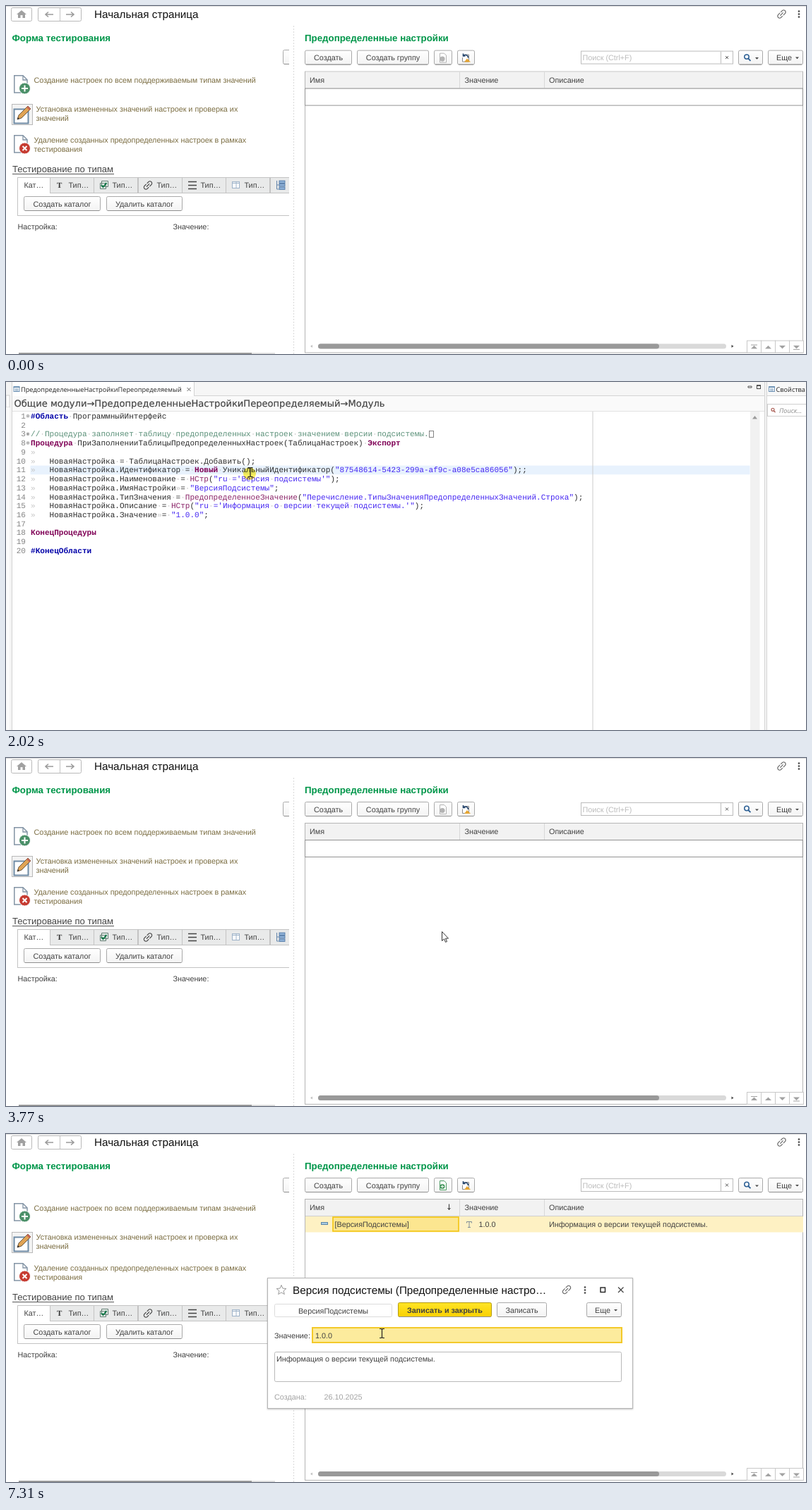
An HTML page that plays this animation: 1133x494 px, repeating every 8 s.

```html
<!DOCTYPE html>
<html lang="ru">
<head>
<meta charset="utf-8">
<title>Предопределенные настройки</title>
<style>
html, body { margin: 0; height: 100%; overflow: hidden; background: #fff; }
svg { display: block; width: 100vw; height: 100vh; }
text { font-family: "Liberation Sans", Arial, sans-serif; white-space: pre; text-rendering: geometricPrecision; }
.code { font-family: "Liberation Mono", "Courier New", monospace; }
.ide { font-family: "Open Sans", "Noto Sans", sans-serif; }
.crumb { font-family: "DejaVu Sans", sans-serif; stroke: #444; stroke-width: .2; }
.ws { fill: #c6c6c6; font-weight: normal; }
.com { fill: #5a9078; }
.str { fill: #4526f2; }
.key { fill: #7f0055; font-weight: bold; }
.fn { fill: #8a2468; }
.dir { fill: #0000a8; font-weight: bold; }
#halo { mix-blend-mode: multiply; }
</style>
</head>
<body>
<svg id="stage" viewBox="0 0 1133 494" preserveAspectRatio="none"></svg>
<script>
const INK = '#404040', UI = 10.8, GREEN = '#00964a', GRAY = '#9b9b9b';
const LOOP = 8000, CODE_IN = 510, CODE_OUT = 2520, CLIP = 2770,
      ROW = 4540, SORT = 5040, DIALOG = 5550, UNSELECT = 7060;

const text = (x, y, s, size = UI, fill = INK, attr = '') =>
  `<text x="${x}" y="${y}" font-size="${size}" fill="${fill}" ${attr}>${s}</text>`;
const rect = (x, y, w, h, fill = 'none', stroke = 'none', attr = '') =>
  `<rect x="${x}" y="${y}" width="${w}" height="${h}" fill="${fill}" stroke="${stroke}" ${attr}/>`;
const path = (d, stroke, fill = 'none', w = 1) =>
  `<path d="${d}" stroke="${stroke}" fill="${fill}" stroke-width="${w}"/>`;
const circle = (x, y, r, fill, attr = '') => `<circle cx="${x}" cy="${y}" r="${r}" fill="${fill}" ${attr}/>`;
const at = (x, y, s, more = '') => `<g transform="translate(${x} ${y}) ${more}">${s}</g>`;
const group = (id, s) => `<g id="${id}">${s}</g>`;
const BOLD = 'font-weight="bold"', MID = 'text-anchor="middle"';

const button = (x, y, w, label = '', fill = 'url(#btn)', stroke = '#a9a9a9', attr = '') =>
  rect(x + .5, y + .5, w - 1, 20, fill, stroke, 'rx="2"') +
  path(`M${x + 2} ${y + 20.5}h${w - 4}`, '#8f8f8f') +
  text(x + w / 2, y + 14.5, label, UI, INK, MID + ' ' + attr);
const more = (x, y) =>
  button(x, y, 50) + text(x + 12, y + 14.5, 'Еще') + path(`M${x + 39} ${y + 10}h5l-2.5 2.6z`, 'none', '#444');
const link = (x, y, c) => at(x, y,
  path('M-1 2.8h-3a2.8 2.8 0 0 1 0-5.6h3.4M1-2.8h3a2.8 2.8 0 0 1 0 5.6H.6M-3 0h6', c, 'none', 1.2), 'rotate(-45)');
const dots = (x, y) => [-4, 0, 4].map(d => circle(x, y + d, 1.3, '#444')).join('');
const page = (x, y, color, sign) => at(x, y,
  path('M.8.8H13l6 6V25H.8z', '#8394a5', '#fff', 1.5) + path('M13 1v6h6', '#8394a5', 'none', 1.3) +
  circle(15.5, 19, 8, color, 'stroke="#fff"') + path(sign, '#fff', 'none', 2));

function header() {
  return rect(0, 0, 1133, 494, '#fff') + path('M0 .5H1133', '#dedede') +
    rect(7.5, 2.5, 29, 19, '#fff', '#b9b9b9', 'rx="2"') +
    path('M15 12l7-6 7 6h-2v5h-3.5v-4h-3v4H17v-5z', 'none', '#a0a0a0') +
    rect(45.5, 2.5, 61, 19, '#fff', '#b9b9b9', 'rx="2"') + path('M76.5 3v18', '#c4c4c4') +
    path('M67 12H56m4-3.5L56 12l4 3.5M85 12h11m-4-3.5l4 3.5-4 3.5', GRAY, 'none', 1.6) +
    text(125, 17.3, 'Начальная страница', 15.26, '#111') +
    link(1098.5, 11.5, '#666') + dots(1123, 11.5) +
    `<path d="M407.5 28V494" stroke="#d9d9d9" stroke-dasharray="2 2"/>`;
}

function leftPane() {
  const olive = '#7a6c40';
  const tabs = [63, 125, 188, 250, 312, 375].map((x, i) =>
    rect(x - .5, 243.5, 62, 22, '#e9eaea', '#c3c3c3') + (i < 5 ? text(x + 25.5, 258, 'Тип…') : '')).join('');
  const icons =
    text(72, 258, 'T', 11, '#333', BOLD + ' style="font-family:Liberation Serif,serif"') +
    path('M135.5 248.5h9v8h-9zM133.5 251.5h8v8h-8z', '#5f7a70', '#eef4f0') + path('M135 254l2.5 3 5-6', '#15784a', 'none', 2) +
    link(201, 254.5, '#444') + path('M258 249.5h12m-12 5h12m-12 5h12', '#444', 'none', 1.4) +
    rect(320.5, 249.5, 10, 9, '#fff', '#9db2c8') + path('M321 251.5h10m-5-2v9', '#9db2c8') +
    path('M383.5 248v12h3m-3-6h3', '#6486ab') +
    [248, 252.5, 257].map(y => rect(387, y, 8, 3.4, '#8eb0d6', '#4973a3', 'stroke-width=".8"')).join('');
  return text(8.5, 50.3, 'Форма тестирования', 13.3, GREEN, BOLD) +
    page(11, 98, '#4b9069', 'M11 19h9m-4.5-4.5v9') +
    text(39.5, 109, 'Создание настроек по всем поддерживаемым типам значений', UI, olive) +
    rect(8.5, 139.5, 29, 29, '#f3f3f3', '#b9b9b9') + rect(11.5, 146.5, 20, 20, '#fff', '#6f8ba5', 'stroke-width="2"') +
    path('M16 161l2-6 13-13 4 4-13 13z', '#6a5741', '#e0a354') + path('M29 144l2-2 4 4-2 2z', 'none', '#c96a55') +
    path('M16 161l1-3 2 2z', 'none', '#333') +
    text(42.5, 150, 'Установка измененных значений настроек и проверка их', UI, olive) + text(42.5, 163, 'значений', UI, olive) +
    page(11, 183, '#c63c32', 'M12.5 16l6 6m0-6l-6 6') +
    text(39.5, 194, 'Удаление созданных предопределенных настроек в рамках', UI, olive) + text(39.5, 207, 'тестирования', UI, olive) +
    text(9, 236.3, 'Тестирование по типам', 13.08, '#444') + path('M9 238.5h144', '#555') +
    `<g clip-path="url(#left)">` + button(392, 62, 40) + rect(16.5, 243.5, 400, 54, '#fff', '#c3c3c3') + tabs +
    path('M62 265.5h340', '#c3c3c3') + text(25.5, 258, 'Кат…') + icons + '</g>' +
    button(25, 270, 109, 'Создать каталог') + button(142, 270, 108, 'Удалить каталог') +
    text(16.5, 317, 'Настройка:') + text(236.5, 317, 'Значение:') +
    rect(18, 492.4, 363, 2, '#d9d9d9') + rect(18, 492.4, 330, 2, '#8c8c8c');
}

function rightPane() {
  const doc = (c, sign) => path('M614.5 66.5h6l3 3v10h-9z', c, '#fff') + circle(618, 74.5, 3.6, c) + sign;
  const nav = [0, 1, 2, 3].map(i => at(1049.5 + 20 * i, 474.5, rect(0, 0, 20, 17, '#fff', '#c8c8c8') +
    path(i < 2 ? 'M5.5 11.5h9L10 7z' : 'M5.5 7h9L10 11.5z', 'none', '#a2a2a2') +
    (i % 3 ? '' : path(i ? 'M5.5 12.5h9' : 'M5.5 6h9', '#a2a2a2')))).join('');
  const empty = rect(423.5, 116.5, 705, 24, '#fff', '#939393');
  const row = rect(424, 117, 705, 22.5, '#fef1c3') + rect(463, 118, 178, 20, '#fce690', '#f3c50f', 'stroke-width="1.6"') +
    rect(446.5, 125.5, 9, 3, '#a9cbe3', '#5c86a6') + text(465.5, 132, '[ВерсияПодсистемы]') +
    path('M652.5 126.5v-2h7v2m-3.5-2v8m-2 0h4', '#7f8c99') + text(669.5, 132, '1.0.0') +
    text(769, 132, 'Информация о версии текущей подсистемы.');
  return button(423, 62, 67, 'Создать') + button(497, 62, 102, 'Создать группу') +
    button(606, 62, 26) + group('docOff', doc('#b3b3b3', '')) +
    group('docOn', doc('#4b9a62', path('M615.8 74.5h4.4m-2.2-2.2v4.4', '#fff'))) +
    button(639, 62, 25) + path('M649.5 68.5h6v10h-9v-6', '#8b8b8b', '#fff') + path('M654.5 73c0-4-4-5-7-3m0-3v3.4h3', '#26466d', 'none', 1.6) +
    path('M649 79l4-5 5 5z', 'none', '#e6a532') +
    rect(814.5, 63.5, 215, 18, '#fff', '#bcbcbc') + path('M1012.5 64v17', '#bcbcbc') +
    text(816.5, 76.5, 'Поиск (Ctrl+F)', UI, '#bcbcbc') + path('M1019 70.5l4 4m0-4l-4 4', '#555') +
    button(1037, 62, 35) + circle(1049, 71.5, 3.2, '#fff', 'stroke="#2c5f94" stroke-width="1.5"') +
    path('M1051.3 74l3.2 3.2', '#2c5f94', 'none', 1.8) + path('M1061 72.5h5l-2.5 2.6z', 'none', '#444') + more(1079, 62) +
    rect(423.5, 92.5, 705, 399, '#fff', '#b5b5b5') + rect(424, 93, 704, 23.5, '#f2f2f2') +
    path('M424 116.5h704', '#cfcfcf') + path('M642.5 93v23m120-23v23', '#d8d8d8') +
    text(430, 108, 'Имя') + text(649.5, 108, 'Значение') + text(769, 108, 'Описание') +
    group('empty', empty) + group('row', row) +
    group('sort', path('M627.5 99.5v8m-2-2.5l2 2.5 2-2.5', '#333')) +
    rect(442, 479, 578, 7, '#d9d9d9', 'none', 'rx="3.5"') + rect(442, 479, 483, 7, '#999', 'none', 'rx="3.5"') +
    path('M434 480.5v4l-3-2z', 'none', '#c0c0c0') + path('M1027.5 480.5v4l3-2z', 'none', '#444') + nav;
}

function dialog() {
  return rect(370.5, 204.5, 517, 185, '#fff', '#b4b4b4', 'filter="url(#shade)"') +
    path('M390 214.5l1.9 4.6 5 .4-3.8 3.2 1.2 4.8-4.3-2.6-4.3 2.6 1.2-4.8-3.8-3.2 5-.4z', '#9a9a9a') +
    text(406, 227, 'Версия подсистемы (Предопределенные настро…', 15.26, '#111') +
    link(794, 221, '#666') + dots(820, 221.5) + rect(842, 218, 6.5, 6.5, 'none', '#222', 'stroke-width="1.4"') +
    path('M867 217.5l7.5 7.5m0-7.5l-7.5 7.5', '#444', 'none', 1.2) +
    rect(380.5, 241.5, 166, 18, '#fff', '#dcdcdc', 'rx="2"') + text(463.5, 254.5, 'ВерсияПодсистемы', UI, INK, MID) +
    button(555, 239, 133, 'Записать и закрыть', 'url(#gold)', '#b39a12', BOLD) +
    button(695, 239, 71, 'Записать') + more(822, 239) +
    text(380, 289.5, 'Значение:') + rect(434, 275, 438, 21, '#fceb9d', '#f3c92a', 'stroke-width="2"') +
    group('selected', rect(437.5, 279, 25.5, 13.5, '#3f66b5') + text(438, 289.5, '1.0.0', UI, '#fff')) +
    group('plain', text(438, 289.5, '1.0.0')) +
    rect(380.5, 309.5, 491, 42, '#fff', '#b9b9b9', 'rx="2"') + text(383, 323, 'Информация о версии текущей подсистемы.') +
    text(380, 376.8, 'Создана:', UI, '#a3a3a3') + text(450.5, 376.8, '26.10.2025', UI, '#a3a3a3');
}

const SOURCE = `#Область ПрограммныйИнтерфейс

// Процедура заполняет таблицу предопределенных настроек значением версии подсистемы.
Процедура ПриЗаполненииТаблицыПредопределенныхНастроек(ТаблицаНастроек) Экспорт
\t
\tНоваяНастройка = ТаблицаНастроек.Добавить();
\tНоваяНастройка.Идентификатор = Новый УникальныйИдентификатор("87548614-5423-299a-af9c-a08e5ca86056");;
\tНоваяНастройка.Наименование = НСтр("ru ='Версия подсистемы'");
\tНоваяНастройка.ИмяНастройки»= "ВерсияПодсистемы";
\tНоваяНастройка.ТипЗначения = ПредопределенноеЗначение("Перечисление.ТипыЗначенияПредопределенныхЗначений.Строка");
\tНоваяНастройка.Описание = НСтр("ru ='Информация о версии текущей подсистемы.'");
\tНоваяНастройка.Значение»= "1.0.0";

КонецПроцедуры

#КонецОбласти`.split('\n');

const span = (cls, s) => `<tspan class="${cls}">${s}</tspan>`;
const TOKENS = /(\/\/.*)|("[^"]*")|(#[А-я]+)|(Процедура |Экспорт|Новый |КонецПроцедуры)|(НСтр|ПредопределенноеЗначение)(?=\()/g;
const paint = line => line
  .replace(TOKENS, (s, ...m) => span(['com', 'str', 'dir', 'key', 'fn'][m.findIndex(Boolean)], s))
  .replace(/ (?!class=)/g, span('ws', '·')).replace(/»/g, span('ws', '»'))
  .replace('\t', span('ws', '»') + '\u00a0'.repeat(3));

function editor() {
  const size = 11.06, pitch = 12.73;
  const lines = SOURCE.map((line, i) => {
    const y = 52 + i * pitch, fold = i == 0 || i == 2 || i == 3;
    return text(28, y, i < 3 ? i + 1 : i + 5, size, '#858585', 'class="code" text-anchor="end"') +
      text(35, y, paint(line), size, '#2c2c2c', 'class="code"') +
      (fold ? circle(31, y - 3.7, 2, '#fff', 'stroke="#999" stroke-width=".8"') +
        path(`M30 ${y - 3.7}h2` + (i == 2 ? 'm-1-1v2' : ''), '#555', 'none', .9) : '');
  }).join('');
  const sheet = (x, y) => rect(x + .5, y + .5, 8, 7, '#fff', '#6f93b5') + path(`M${x} ${y + 1.5}h9m-7 2.5h5m-5 2h5`, '#6f93b5');
  return rect(0, 0, 1133, 494, '#f4f4f4') + rect(0, 19, 5, 17, '#fff', '#d0d0d0') + rect(0, 36, 5, 458, '#fbfbfb') +
    rect(8, 0, 1066, 494, '#fff') + rect(8, 0, 1066, 19, '#f6f6f6') + rect(9, 0, 257, 20, '#fff') +
    path('M8.5 0v494M266.5 0v19M266 19.5h808M1074.5 0v494', '#d4d4d4') +
    rect(9, 20, 1065, 21.5, '#fafafa') + path('M9 41.5h1065', '#e2e2e2') +
    sheet(10.5, 6) + text(21, 14, 'ПредопределенныеНастройкиПереопределяемый', 9.2, '#222', 'class="ide"') +
    path('M256.5 8l5 5m0-5l-5 5', '#666') +
    path('M1051 6h5v2h-5z', '#555', '#fff') + rect(1063.5, 4.5, 5, 5, '#fff', '#444') + path('M1063 5h6', '#444', 'none', 1.6) +
    text(11.5, 35, 'Общие модули→ПредопределенныеНастройкиПереопределяемый→Модуль', 13.08, '#444', 'class="crumb"') +
    rect(34.5, 118.6, 1019, 12.7, '#e8f2fd') + path('M831 42v452', '#cbcbcb') + lines +
    rect(599.5, 69.5, 6, 9, '#fff', '#777', 'stroke-width=".9"') +
    rect(1054, 42, 13.5, 452, '#f1f1f1') + path('M1057 52.5h7l-3.5-4.5z', 'none', '#9a9a9a') +
    rect(1077.5, -1, 60, 500, '#fff', '#d4d4d4') + rect(1078, 0, 55, 19, '#f8f8f8') +
    sheet(1080, 6) + text(1090.5, 14.2, 'Свойства', 9.2, '#222', 'class="ide"') +
    path('M1078 19.5h55', '#d4d4d4') + rect(1078.5, 31.5, 60, 17, '#fff', '#cfcfcf') +
    circle(1086, 39.3, 2, '#fff', 'stroke="#a5534a" stroke-width="1.1"') + path('M1087.5 41l2 2', '#a5534a', 'none', 1.3) +
    text(1095, 43.8, 'Поиск...', 9.2, '#8c8c8c', 'class="ide" font-style="italic"');
}

const beam = path('M-3.5-6.5h2.5l1 1 1-1h2.5M-3.5 6.5h2.5l1-1 1 1h2.5M0-5.5v11', '#222', 'none', 1.2);
const stage = document.getElementById('stage');
stage.innerHTML = `<defs>
  <linearGradient id="btn" x2="0" y2="1"><stop stop-color="#fff"/><stop offset="1" stop-color="#f3f3f3"/></linearGradient>
  <linearGradient id="gold" x2="0" y2="1"><stop stop-color="#ffe526"/><stop offset="1" stop-color="#f9d000"/></linearGradient>
  <clipPath id="left"><rect width="401" height="494"/></clipPath>
  <filter id="shade"><feDropShadow dx="0" dy="1" stdDeviation="1.2" flood-opacity=".25"/></filter></defs>` +
  group('app', header() + leftPane() + text(423, 50.3, 'Предопределенные настройки', 13.3, GREEN, BOLD) + group('pane', rightPane())) +
  group('dialog', dialog()) + group('editor', editor()) +
  group('halo', circle(-1, 2, 9, '#fff15c')) +
  group('cursor', group('beam', beam) +
    group('arrow', path('M.5.5v13l3-2.7 2 4.6 2-.9-2-4.4h4z', '#333', '#fff')));

// Pointer stops: time, x, y
const STOPS = [
  [510, 380, 158], [760, 360, 140], [1010, 348, 130], [1260, 346, 128],
  [2770, 650, 310], [3020, 640, 290], [3270, 628, 265], [3520, 619, 249], [3770, 617, 246],
  [4040, 630, 300], [4290, 636, 341], [4540, 656, 230], [4790, 671, 113], [5040, 600, 107],
  [5300, 584, 130], [5550, 578, 141], [6050, 530, 230], [6290, 487, 307], [6540, 487, 294],
  [6810, 506, 287], [7060, 524, 284], [7310, 532.5, 283]
];

const node = id => document.getElementById(id);
const show = (id, on) => node(id).style.display = on ? '' : 'none';
const move = (id, x, y) => node(id).setAttribute('transform', `translate(${x} ${y})`);
const start = performance.now();

function draw() {
  const t = (performance.now() - start) % LOOP;
  const coding = t >= CODE_IN && t < CODE_OUT, typing = coding || t >= 6810;
  show('app', !coding);
  show('editor', coding);
  show('row', t >= ROW);
  show('empty', t < ROW);
  show('docOn', t >= ROW);
  show('docOff', t < ROW);
  show('sort', t >= SORT);
  show('dialog', t >= DIALOG);
  show('selected', t < UNSELECT);
  show('plain', t >= UNSELECT);
  show('cursor', coding || t >= CLIP);
  show('halo', coding);
  show('beam', typing);
  show('arrow', !typing);
  move('pane', 0, t < CLIP ? .6 : 0);
  const [, x, y] = STOPS.findLast(s => s[0] <= t) || STOPS[0];
  move('cursor', x, y);
  move('halo', x, y);
  requestAnimationFrame(draw);
}
draw();
</script>
</body>
</html>
```
